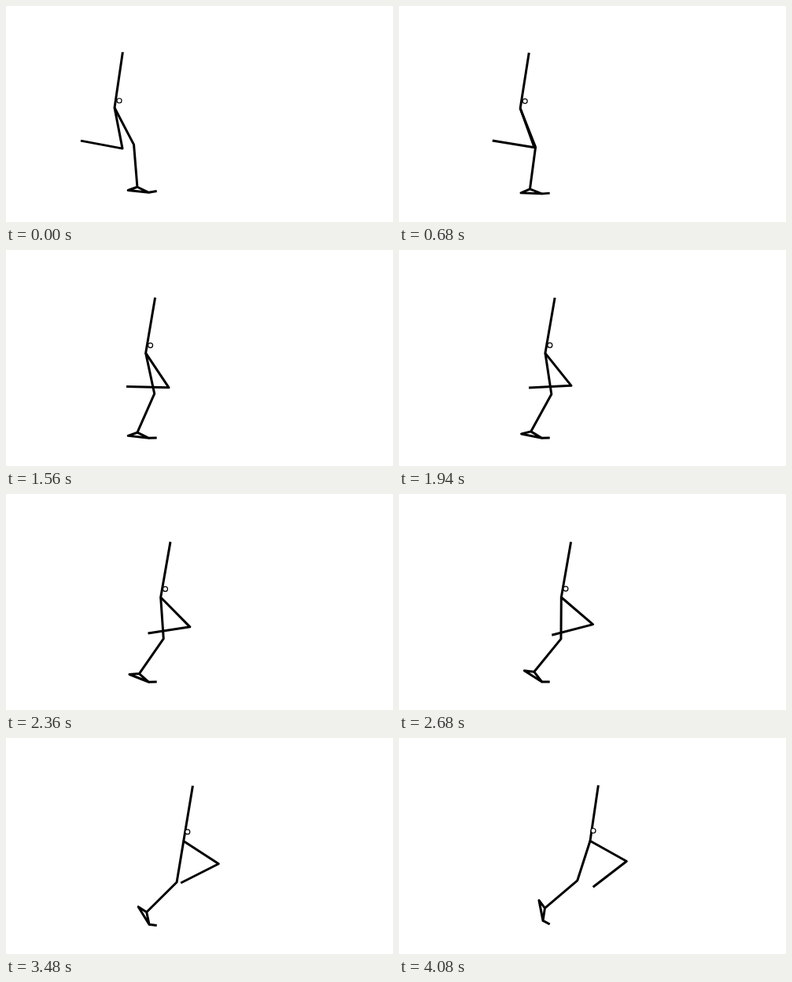
Write an HTML page with a canvas that moves like this. It is 492x276 px and loops after 4100 ms.

```html
<!DOCTYPE html>
<html>
<head>
<meta charset="utf-8">
<style>
  html, body { margin: 0; width: 100%; height: 100%; overflow: hidden; background: #fff; }
  canvas { display: block; }
</style>
</head>
<body>
<canvas id="stage" width="492" height="276"></canvas>
<script>
const ctx = document.getElementById('stage').getContext('2d');
const LOOP = 4100, LAST_STEP = 88;
const TORSO = 71.9, THIGH = 53.1, SHANK = 54;
const BALL_TO_HEEL = 26.5, BALL_TO_ANKLE = 16.2, ANKLE_RISE = 0.343;

// Polynomial in u, lowest power first
const poly = (u, ...c) => c.reduceRight((sum, k) => sum * u + k, 0);

// Point at a distance; the angle runs from straight down towards the front
const limb = ([x, y], length, angle) =>
  [x + length * Math.sin(angle), y + length * Math.cos(angle)];

// Playback rhythm: three steps every 140 ms, held 20, 100 and 20 ms
function stepAt(t) {
  const r = t % 140;
  return 3 * Math.floor(t / 140) + (r >= 20) + (r >= 120);
}

// Joint positions at progress u from 0 to 1
function pose(u) {
  const hip = [poly(u, 138, 101, 4), poly(u, 130, 6, -4.5)];
  const lean = 0.145 + u * (1 - u) * (0.06 + 0.09 * u);
  const neck = limb(hip, TORSO, Math.PI - lean);
  const centre = [hip[0] + 6 - 2 * u ** 4, poly(u, 121, 5, -7.5)];

  const swingKnee = limb(hip, THIGH, poly(u, 0.19, 0.88, 0.63, -0.64));
  const swingDip = poly(u, -0.1865, -0.093, 1.575, -0.636);
  const swingEnd = limb(swingKnee, SHANK, swingDip - Math.PI / 2);

  // The planted foot lands flat, then rolls over its ball
  const landing = (1 - u) ** 8;
  const toe = [191.7, 240 - 3.5 * landing - 2 * u ** 8];
  const ball = [181.5 + 1.5 * u ** 6, 240.4 - 2.1 * landing - 7 * u ** 7];
  const pitch = poly(u, 0.107, -0.523, -0.078, 5.018, -3.145);
  const heel = limb(ball, BALL_TO_HEEL, -Math.PI / 2 - pitch);
  const ankle = limb(ball, BALL_TO_ANKLE, -Math.PI / 2 - pitch - ANKLE_RISE);
  const knee = limb(hip, THIGH, poly(u, 0.48, -0.64, -0.15));

  return { hip, neck, centre, swingKnee, swingEnd, toe, ball, heel, ankle, knee };
}

function line(...points) {
  ctx.beginPath();
  points.forEach(p => ctx.lineTo(...p));
  ctx.stroke();
}

function draw(u) {
  const p = pose(u);
  ctx.fillStyle = '#fff';
  ctx.fillRect(0, 0, 492, 276);
  ctx.lineJoin = 'round';
  ctx.lineWidth = 3;
  line(p.neck, p.hip, p.swingKnee, p.swingEnd);
  line(p.hip, p.knee, p.ankle, p.heel, p.ball, p.ankle);
  line(p.ball, p.toe);

  ctx.lineWidth = 1.2;
  ctx.beginPath();
  ctx.arc(...p.centre, 3, 0, 2 * Math.PI);
  ctx.fill();
  ctx.stroke();
}

function tick() {
  draw(stepAt(performance.now() % LOOP) / LAST_STEP);
  requestAnimationFrame(tick);
}
tick();
</script>
</body>
</html>
```
